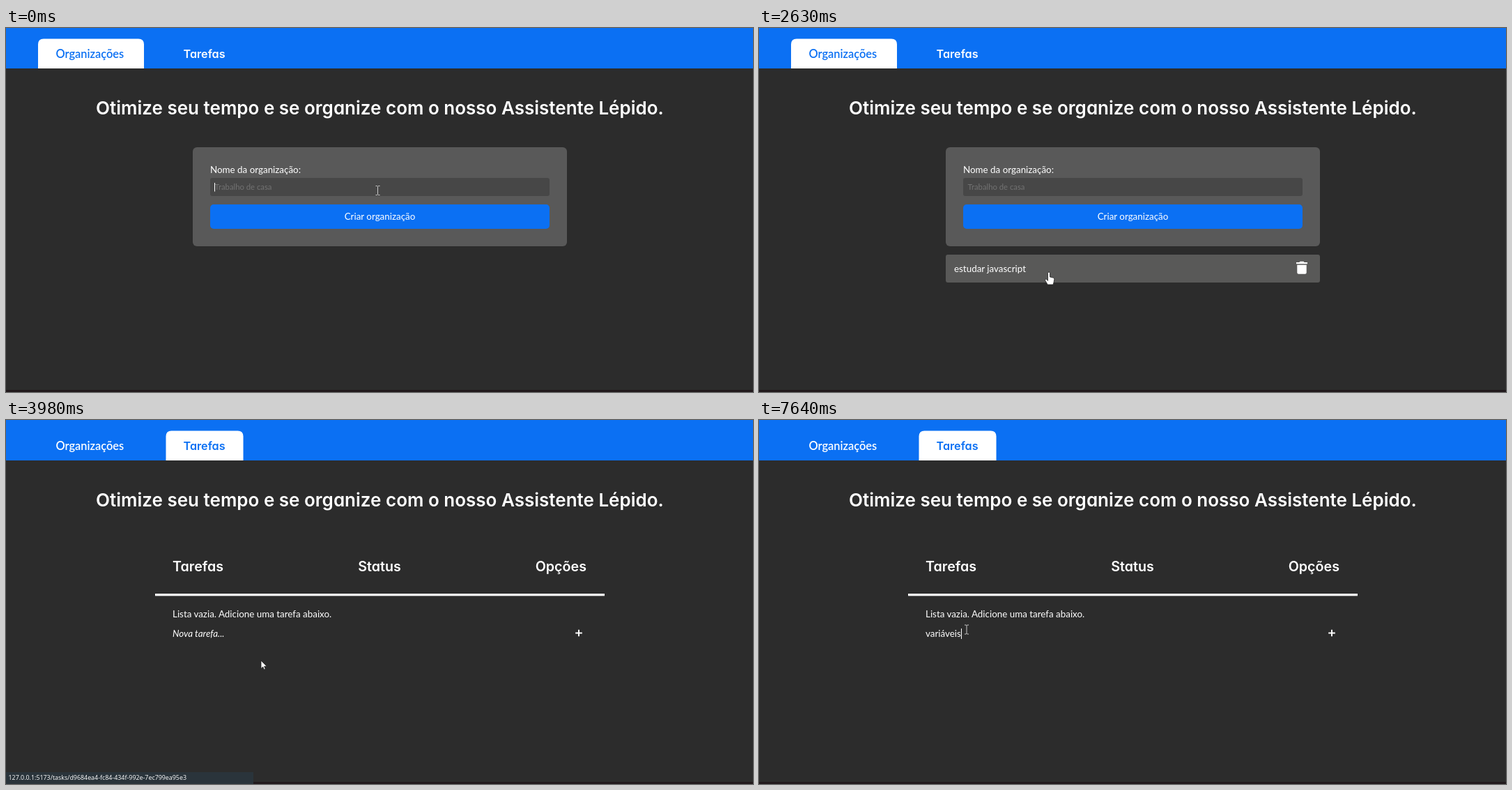
Write an HTML page that moves like this. It is 1072 by 522 pixels and loops after 8000 ms.

```html
<!DOCTYPE html>
<html lang="pt-BR">
<head>
<meta charset="utf-8">
<title>Tarefas</title>
<style>
  html, body { margin: 0; width: 100%; height: 100%; overflow: hidden; background: #2c2c2c; }
  svg { display: block; width: 100%; height: 100%; }
  text { font: 13.4px Lato, sans-serif; fill: #fff; white-space: pre; }
  .title, .head, .tab-b { font-family: Inter, sans-serif; font-weight: 600; font-feature-settings: "cv11"; }
  .title { font-size: 26px; }
  .head { font-size: 19.7px; }
  .tab-a { font-size: 16.4px; font-weight: 600; }
  .tab-b { font-size: 16.2px; }
  .field { font-size: 11.3px; }
  .hint { fill: #727272; }
  .url { font: 8.9px "Open Sans", sans-serif; }
  .active { fill: #0b70f3; }
  .caret { fill: #fff; }
  .pointer { fill: #fff; stroke: #222; stroke-width: .8; stroke-linejoin: round; }
  .beam { fill: none; stroke: #c8c8c8; stroke-width: 1; }
</style>
</head>
<body>
<svg viewBox="0 0 1072 522" preserveAspectRatio="none">
  <rect width="1072" height="522" fill="#2c2c2c"/>
  <rect y="519" width="1072" height="3" fill="#21191c"/>
  <rect width="1072" height="58" fill="#0b70f3"/>
  <path id="tab" fill="#fff"/>
  <text id="tabA" class="tab-a" x="71.5" y="42.5">Organizações</text>
  <text id="tabB" class="tab-b" x="254.5" y="42.5">Tarefas</text>
  <text class="title" x="536.5" y="123.5" text-anchor="middle">Otimize seu tempo e se organize com o nosso Assistente Lépido.</text>

  <g id="formPage">
    <rect x="268" y="171" width="537" height="142" rx="6" fill="#595959"/>
    <text x="293" y="208">Nome da organização:</text>
    <rect x="293" y="215" width="487" height="26" rx="3" fill="#474747"/>
    <path id="spelling" d="M299.5 234H336" stroke="#c44" stroke-dasharray="1.5 1" stroke-width=".9"/>
    <text id="nameHint" class="field hint" x="299.5" y="232">Trabalho de casa</text>
    <text id="nameText" class="field" x="299" y="232"></text>
    <rect id="nameCaret" class="caret" y="222" width="1" height="12.5"/>
    <rect x="293" y="253" width="487" height="35" rx="5" fill="#0b70f3"/>
    <text x="536.5" y="275" text-anchor="middle">Criar organização</text>
    <g id="item">
      <rect x="268" y="325" width="537" height="40" rx="3" fill="#595958"/>
      <text x="280" y="349.5">estudar javascript</text>
      <path fill="#fff" d="M771 336h4.5l1-1.2h5l1 1.2h4.5v2.2h-16zM772.3 339.8h13.4v11a2 2 0 0 1-2 2h-9.4a2 2 0 0 1-2-2z"/>
    </g>
  </g>

  <g id="taskPage">
    <text class="head" x="239" y="217">Tarefas</text>
    <text class="head" x="536" y="217" text-anchor="middle">Status</text>
    <text class="head" x="833" y="217" text-anchor="end">Opções</text>
    <rect x="214" y="249" width="645" height="3.3" fill="#fff"/>
    <text x="239" y="283">Lista vazia. Adicione uma tarefa abaixo.</text>
    <text id="taskHint" x="239" y="310.5" font-style="italic" style="font-style:italic">Nova tarefa...</text>
    <text id="taskText" x="239" y="310.5"></text>
    <rect id="taskCaret" class="caret" y="299" width="1" height="15"/>
    <path d="M817.2 305.5h9.6M822 300.7v9.6" stroke="#fff" stroke-width="1.9"/>
  </g>

  <g id="status">
    <rect y="505" width="355" height="17" fill="#2a343b"/>
    <text class="url" x="3.5" y="516">127.0.0.1:5173/tasks/d9684ea4-fc84-434f-992e-7ec799ea95e3</text>
  </g>
  <path id="cursor"/>
</svg>
<script>
const LOOP = 8000, CREATED = 1800, OPENED = 3980;
const el = id => document.getElementById(id);

const shapes = {
  beam: 'M-3-6.5h2.2l.8.8.8-.8H3M0-5.7V5.7M-3 6.5h2.2l.8-.8.8.8H3',
  arrow: 'M0 0V11.5L2.7 9 4.4 13 6.3 12.2 4.6 8.3H8.2z',
  hand: 'M-1.5 1.5a1.5 1.5 0 0 1 3 0V7l5 1.2q1.5.5 1.3 2.2l-.8 4.6-1 3H-1.8L-5 12.5q-1-1.5.2-2.2 1-.6 2 .6l1.3 1.5z'
};

// Each track lists [start time, value...]; a value holds until the next entry.
const cursorTrack = [
  [0, 'beam', 533.5, 233], [1620, 'hand', 541, 270],
  [2460, 'hand', 520, 283], [2550, 'arrow', 466, 318], [2630, 'hand', 416, 350],
  [2710, 'hand', 400, 349], [2800, 'hand', 385, 347], [2890, 'hand', 374, 346],
  [2990, 'hand', 365, 345], [3150, 'hand', 366, 345], [3640, 'arrow', 366, 345],
  [4640, 'beam', 298, 300.5]
];
const nameTrack = [
  [0, ''], [170, 'e'], [440, 'es'], [750, 'estud'], [850, 'estudar '], [950, 'estudar ja'],
  [1060, 'estudar jav'], [1150, 'estudar java'], [1400, 'estudar javas'],
  [1510, 'estudar javascript'], [CREATED, '']
];
const taskTrack = [
  [0, ''], [5070, 'v'], [5240, 'va'], [5670, 'var'], [5920, 'vari'], [6660, 'variá'],
  [7020, 'variáv'], [7320, 'variáve'], [7490, 'variávei'], [7640, 'variáveis']
];
const statusTrack = [[0, 0], [3150, .5], [3230, 1], [4230, .65], [4320, .3], [4400, 0]];

const at = (track, t) => track.findLast(step => step[0] <= t).slice(1);
const within = (t, from, to) => t >= from && t < to;
const show = (id, on) => el(id).style.display = on ? '' : 'none';

function drawField(name, value, caretOn) {
  const text = el(name + 'Text');
  text.textContent = value;
  show(name + 'Hint', !value);
  show(name + 'Caret', caretOn);
  const width = value ? text.getComputedTextLength() : 0;
  el(name + 'Caret').setAttribute('x', Math.round(+text.getAttribute('x') + width));
}

function drawTabs(onTasks) {
  const [left, width] = onTasks ? [229.5, 111] : [46, 152];
  el('tab').setAttribute('d', `M${left} 58V23.5q0-8 8-8h${width - 16}q8 0 8 8V58z`);
  el('tabA').classList.toggle('active', !onTasks);
  el('tabB').classList.toggle('active', onTasks);
}

function draw(t) {
  const onTasks = t >= OPENED;
  drawTabs(onTasks);
  show('formPage', !onTasks);
  show('taskPage', onTasks);

  if (onTasks) {
    const caretOn = within(t, 4730, 4930) || within(t, 5070, 6410) || t >= 6660;
    drawField('task', at(taskTrack, t)[0], caretOn);
  } else {
    const focused = t < 1620;
    drawField('name', at(nameTrack, t)[0], focused);
    show('spelling', focused && t >= 850);
    show('item', t >= CREATED);
  }

  el('status').setAttribute('opacity', at(statusTrack, t)[0]);
  const [shape, x, y] = at(cursorTrack, t);
  const cursor = el('cursor');
  cursor.setAttribute('d', shapes[shape]);
  cursor.setAttribute('class', shape === 'beam' ? 'beam' : 'pointer');
  cursor.setAttribute('transform', `translate(${x} ${y})`);
}

function tick() {
  draw(performance.now() % LOOP);
  requestAnimationFrame(tick);
}
tick();
</script>
</body>
</html>
```
